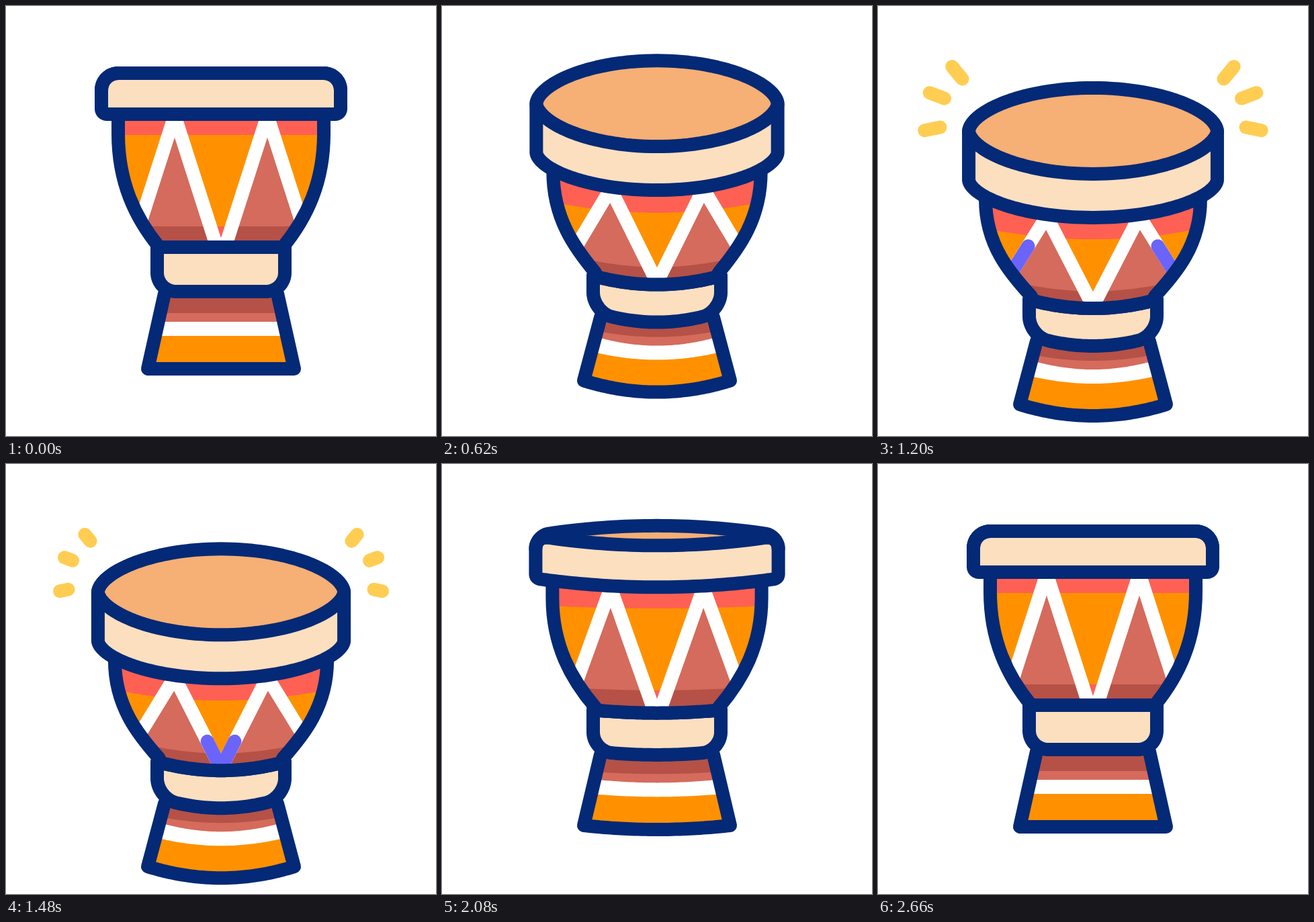
An HTML page with a canvas for the animation above (3 s loop, 640 by 640 pixels).

```html
<!DOCTYPE html>
<html lang="en">
<head>
<meta charset="utf-8">
<title>Drum</title>
<style>
  html, body { margin: 0; width: 100%; height: 100%; overflow: hidden; background: #fff; }
  canvas { display: block; width: 640px; height: 640px; }
</style>
</head>
<body>
<canvas id="stage" width="640" height="640"></canvas>
<script>
const ctx = document.getElementById('stage').getContext('2d');
const LOOP = 3000, CX = 320;
const NAVY = '#042976', CREAM = '#fcdfbe', SKIN = '#f6af74', RED = '#ff6054',
      ORANGE = '#ff9100', CLAY = '#d56b5c', DARK = '#b55147',
      PURPLE = '#6a64fb', YELLOW = '#ffcd52', WHITE = '#fff';

// Height of the foot: [ms, y]
const FOOT = [[215, 540], [430, 535], [740, 573], [1200, 593], [1830, 603],
              [2080, 538], [2350, 556], [2650, 540]];
const BURSTS = [718, 1106, 1430, 1770];
const RUNS = [730, 1435];

const lerp = (a, b, u) => a + (b - a) * u;
const clamp = u => Math.min(1, Math.max(0, u));
const easeOut = u => 1 - (1 - clamp(u)) ** 2;
const smooth = (t, from, to) => {
  const u = clamp((t - from) / (to - from));
  return u * u * (3 - 2 * u);
};

// Monotone cubic through the keys
function along(keys, t) {
  t = Math.min(Math.max(t, keys[0][0]), keys[keys.length - 1][0]);
  const slope = j => keys[j] && keys[j + 1] ?
    (keys[j + 1][1] - keys[j][1]) / (keys[j + 1][0] - keys[j][0]) : 0;
  const tangent = j => {
    const a = slope(j - 1), b = slope(j);
    return a * b > 0 ? 2 * a * b / (a + b) : 0;
  };
  let i = 0;
  while (i < keys.length - 2 && t >= keys[i + 1][0]) i++;
  const [t0, v0] = keys[i], [t1, v1] = keys[i + 1];
  const d = t1 - t0, u = (t - t0) / d, q = u * u, c = q * u;
  return lerp(v0, v1, 3 * q - 2 * c)
       + d * (tangent(i) * (c - 2 * q + u) + tangent(i + 1) * (c - q));
}

// Points are given as offset from the axis and height above the foot.
// A beat pushes the upper part down by `beat`.
let foot, tilt, curve, beat;
const Y = y => foot + y + beat * clamp((-y - 160) / 120);
const move = (x, y) => ctx.moveTo(CX + x, Y(y));
const line = (x, y) => ctx.lineTo(CX + x, Y(y));
const bez = (a, b, c, d, e, f) => ctx.bezierCurveTo(CX + a, Y(b), CX + c, Y(d), CX + e, Y(f));

// Bowed edge from -h to h (dir 1) or back (dir -1). The middle sags; p = 1 is a parabola,
// p = .5 an ellipse. Corners of radius r bend up, or down if r is negative.
function edge(h, y, sag, { r = 0, p = 1, dir = 1 } = {}) {
  const n = 60, R = Math.abs(r);
  for (let i = 0; i <= n; i++) {
    const a = Math.PI * (i / n - .5), x = h * Math.sin(a);
    const d = Math.max(0, Math.abs(x) - h + R);
    const corner = R - Math.sqrt(Math.max(0, R * R - d * d));
    line(dir * x, y + sag * Math.max(0, Math.cos(a)) ** (2 * p) - Math.sign(r) * corner);
  }
}

function fill(color, build) {
  ctx.beginPath(); build(); ctx.closePath();
  ctx.fillStyle = color; ctx.fill();
}
function stroke(color, build) {
  ctx.beginPath(); build();
  ctx.strokeStyle = color; ctx.lineWidth = 20; ctx.stroke();
}
function clipped(build, paint) {
  ctx.save();
  ctx.beginPath(); build(); ctx.clip();
  paint();
  ctx.restore();
}
function flood(color) {
  ctx.fillStyle = color;
  ctx.fillRect(0, 0, 640, 640);
}
const below = (color, h, y, sag) => fill(color, () => {
  edge(h, y, sag); line(h, 60); line(-h, 60);
});

const band = dir => edge(95, -181 + 25 * curve, 13 * curve, { dir });

function drawFoot() {
  const b = curve, top = -112 + 18 * b;
  const legs = () => { move(-84, top); edge(109, 0, 17 * b); line(84, top); };
  clipped(legs, () => {
    flood(DARK);
    below(CLAY, 85, -83 + 10 * b, 8 * b);
    below(WHITE, 90, -70 + 5 * b, 13 * b);
    below(ORANGE, 100, -49 + 5 * b, 13 * b);
  });
  stroke(NAVY, legs);
}

function drawNeck() {
  const shape = () => {
    band(1);
    edge(95, -115 + 12 * curve, 16 * curve, { r: 28, dir: -1 });
    ctx.closePath();
  };
  fill(CREAM, shape);
  stroke(NAVY, shape);
}

// Part of both zigzag halves, from the valley (0) over the peak (1) to the outer end (2)
function zigzag(from, to, valley, peak, outer) {
  for (const s of [-1, 1]) {
    const point = u => [s * 69 * u, u < 1 ? lerp(valley, peak, u) : lerp(peak, outer, u - 1)];
    move(...point(from));
    if (from < 1 && to > 1) line(...point(1));
    line(...point(to));
  }
}

function drawBody(t) {
  const k = tilt, x = 153 + beat;
  const rim = -385 + 38 * k, bend = -350 + 38 * k, end = -181 + 20 * k;
  const bulge = [x, -278 + 36 * k], waist = [128 - 7 * k + beat / 3, -225 + 28 * k];
  const left = () => {
    move(-x, rim); line(-x, bend);
    bez(-bulge[0], bulge[1], -waist[0], waist[1], -92, end);
  };
  const right = () => {
    line(92, end);
    bez(...waist, ...bulge, x, bend);
    line(x, rim);
  };
  const valley = -162 + 16 * k, peak = -377 + 90 * k, outer = valley - 24 * k;
  const shade = [160, -212 + 15 * k, 28 * k];

  clipped(() => { left(); band(1); right(); }, () => {
    flood(RED);
    below(ORANGE, 160, -348 + 80 * k, 17 * k);
    below(RED, ...shade);
    clipped(() => {
      for (const s of [-69, 69]) {
        move(s, peak); line(0, valley); line(2 * s, outer); ctx.closePath();
      }
    }, () => {
      flood(CLAY);
      below(DARK, ...shade);
    });
    stroke(WHITE, () => zigzag(0, 2, valley, peak, outer));
    for (const start of RUNS) {
      const age = t - start;
      if (age <= 0 || age > 650) continue;
      const head = 2 * easeOut(age / 600), tail = 2 * easeOut((age - 110) / 800);
      stroke(PURPLE, () => zigzag(tail, head, valley, peak, outer));
    }
  });
  stroke(NAVY, () => { left(); move(92, end); right(); });
}

function drawRim() {
  const k = tilt, h = 178 + beat, p = 1 - .42 * k ** 3;
  const mid = -440 + 26 * k, rise = 64 * k, round = { r: -25 * (1 - k), p };
  const top = () => edge(h, mid, -rise, round);
  const front = dir => edge(h, mid, rise, { ...round, dir });
  const outline = () => {
    top();
    edge(h, -379 + 38 * k, 56 * k, { r: 8 * (1 - k), p, dir: -1 });
    ctx.closePath();
  };
  fill(CREAM, outline);
  fill(SKIN, () => { top(); front(-1); });
  stroke(NAVY, outline);
  stroke(NAVY, () => front(1));
}

function drawRays(t) {
  const rays = [[227.5, -412.5, .98, .2], [221, -455.5, .94, -.35], [194.5, -484.5, .64, -.77]];
  for (const start of BURSTS) {
    const age = t - start;
    if (age <= 0 || age >= 290) continue;
    const from = 47 * clamp((age - 150) / 140), to = 47 * clamp(age / 188);
    stroke(YELLOW, () => {
      for (const [x, y, dx, dy] of rays) for (const s of [-1, 1]) {
        ctx.moveTo(CX + s * (x + dx * from), foot + y + dy * from);
        ctx.lineTo(CX + s * (x + dx * to), foot + y + dy * to);
      }
    });
  }
}

function draw(t) {
  foot = along(FOOT, t);
  tilt = smooth(t, 210, 630) - smooth(t, 1840, 2190);
  curve = Math.sin(tilt * Math.PI / 2);
  beat = t > 560 && t < 2160 ? 7.7 * Math.sin(Math.PI * (t - 560) / 400) ** 2 : 0;
  flood(WHITE);
  ctx.lineCap = ctx.lineJoin = 'round';
  drawFoot();
  drawNeck();
  drawBody(t);
  stroke(NAVY, () => band(1));
  drawRim();
  drawRays(t);
}

const begin = performance.now();
function tick() {
  draw((performance.now() - begin) % LOOP);
  requestAnimationFrame(tick);
}
tick();
</script>
</body>
</html>
```
